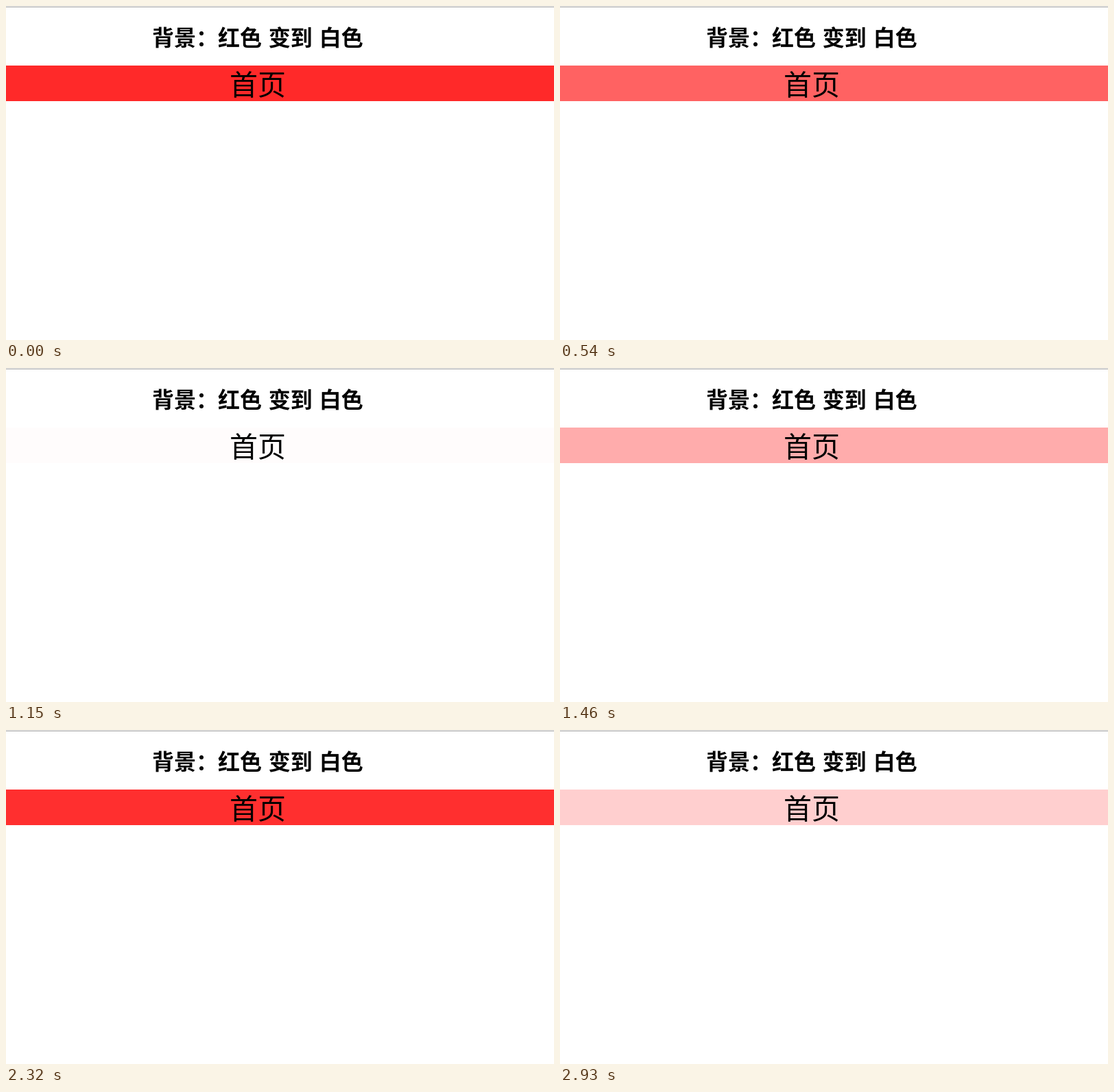
An HTML page for the animation above (3010 ms loop, 799 by 488 pixels).

```html
<!DOCTYPE html>
<html lang="zh-CN">
<head>
<meta charset="utf-8">
<title>背景：红色变到白色</title>
<style>
  html, body { margin: 0; width: 100%; height: 100%; overflow: hidden; background: #fff; }
  svg { display: block; width: 799px; height: 488px; }
  text { font-family: "Noto Sans CJK SC", "Noto Sans CJK", sans-serif; fill: #000; }
  .title { font-size: 32px; font-weight: 700; word-spacing: 2.6px; }
  .item { font-size: 41px; font-weight: 350; }
</style>
</head>
<body>
<svg viewBox="0 0 799 488">
  <rect width="799" height="1" fill="#eee"/>
  <rect y="1" width="799" height="1" fill="#a9a9a9"/>
  <text class="title" x="213" y="58">背景：红色 变到 白色</text>
  <rect id="bar" y="87" width="799" height="52" fill="rgb(255,43,43)"/>
  <text class="item" x="326" y="130">首页</text>
</svg>
<script>
  const LOOP = 3010;
  const STEPS = 39;    // colour changes per loop
  const LEAD = 12;     // ms by which each step comes early
  const FADE = 986;    // ms from red to white, or back
  const RED_AT = 160;  // first moment of pure red
  const bar = document.getElementById('bar');

  // Time of the current colour step
  function stepTime(t) {
    const step = LOOP / STEPS;
    return Math.min(STEPS - 1, Math.floor((t + LEAD) / step)) * step;
  }

  // Linear triangle wave: 0 is red, 1 is white
  function whiteness(t) {
    const phase = (t - RED_AT) / FADE;
    return 1 - Math.abs((phase + 2) % 2 - 1);
  }

  function draw(now) {
    const c = Math.round(255 * whiteness(stepTime(now % LOOP)));
    bar.setAttribute('fill', `rgb(255,${c},${c})`);
  }

  const begin = performance.now();
  function tick() {
    draw(performance.now() - begin);
    requestAnimationFrame(tick);
  }
  tick();
</script>
</body>
</html>
```
